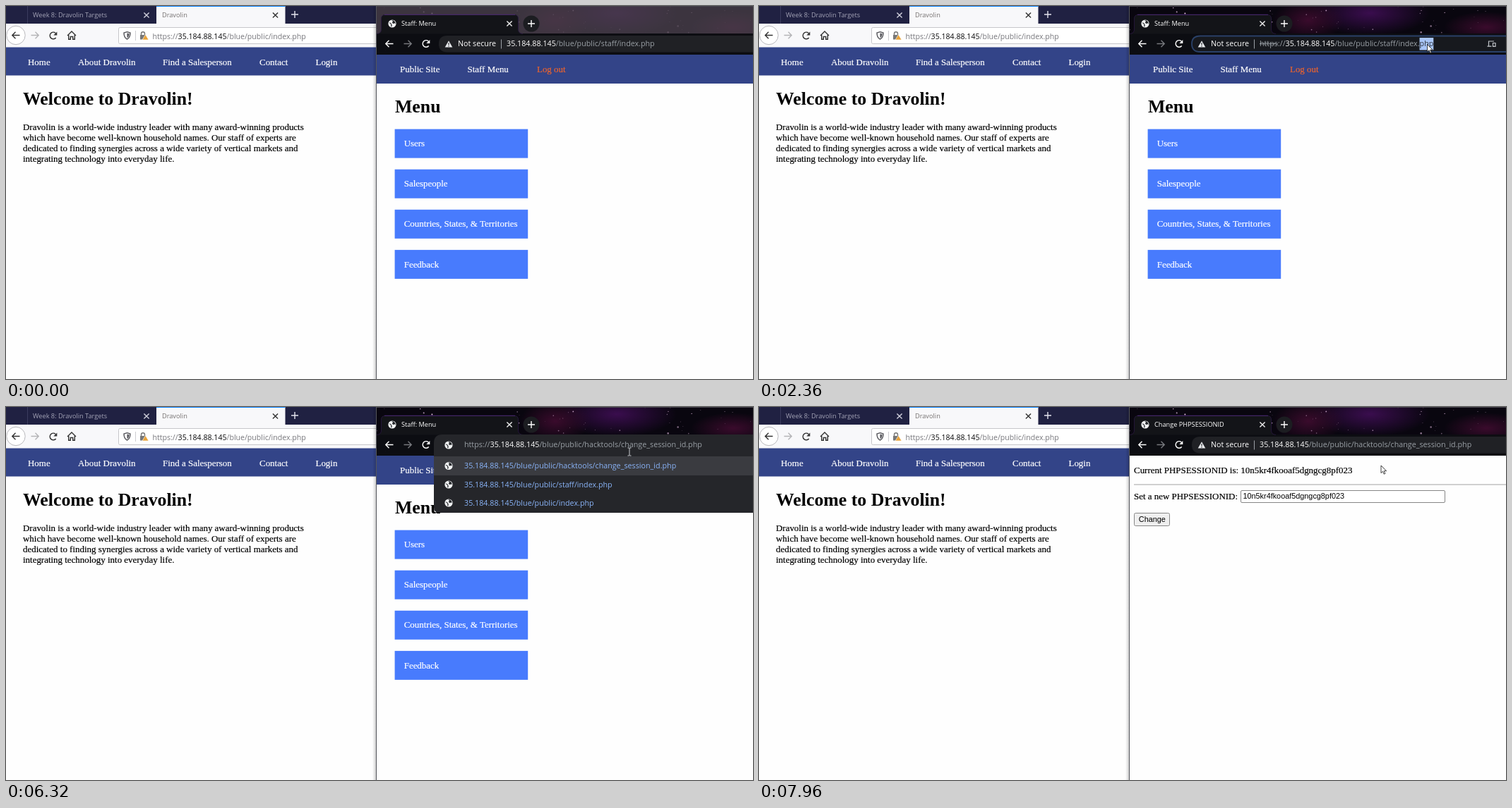
An HTML page that plays this animation: 1058x529 px, repeating every 8 s.

```html
<!DOCTYPE html>
<html lang="en">
<head>
<meta charset="utf-8">
<title>Session demo</title>
<style>
html, body { margin: 0; width: 100%; height: 100%; overflow: hidden; background: #fefefe; }
svg { display: block; width: 100%; height: 100%; }
text { white-space: pre; }
.ui { font-family: "Open Sans", sans-serif; font-size: 10.73px; }
.tab { font-family: "Open Sans", sans-serif; font-size: 9.2px; }
.page { font-family: "Liberation Serif", serif; font-size: 12.95px; fill: currentColor; stroke: currentColor; stroke-width: .2; }
.h1 { font-family: "Liberation Serif", serif; font-size: 25.8px; font-weight: bold; }
.form { font-family: "Liberation Sans", sans-serif; font-size: 10.85px; }
.white { color: #fff; fill: currentColor; }
.dim { fill: #9aa0a6; }
.struck { text-decoration: line-through; }
.sel tspan, .sel { fill: #2b3038; }
.line { fill: none; stroke-width: 1.4; }
</style>
</head>
<body>
<svg id="stage" viewBox="0 0 1058 529">
  <defs>
    <linearGradient id="shadow"><stop offset="0" stop-opacity="0"/><stop offset="1" stop-opacity=".22"/></linearGradient>
    <radialGradient id="violet"><stop offset="0" stop-color="#3a0d4e"/><stop offset="1" stop-color="#3a0d4e" stop-opacity="0"/></radialGradient>
    <radialGradient id="wine"><stop offset="0" stop-color="#3a0b2c"/><stop offset="1" stop-color="#3a0b2c" stop-opacity="0"/></radialGradient>
    <clipPath id="strip"><path d="M525 0H1058V69H525Z"/></clipPath>
    <path id="cross" class="line" d="M-3.6-3.6 3.6 3.6M3.6-3.6-3.6 3.6"/>
    <path id="plus" class="line" d="M-5 0H5M0-5V5"/>
    <path id="back" class="line" d="M5.5 0H-5M-.5-4.7-5.2 0-.5 4.7"/>
    <g id="reload"><path class="line" d="M3.7 3A4.8 4.8 0 1 1 3.2-3.6"/><path d="M5.3-5.6V-.6H.3Z" stroke="none"/></g>
    <g id="globe"><circle r="5.6" fill="#f1f3f4"/><path fill="#25272b" d="M-4.6-1.4-1.8 1.1-1.7 4.7-.2 3.2-.8.4-2.6-1.2ZM-1-4.6 1.2-3.2-.3-1.6 1.8.3 3.4-.8 4.7.5 4.2-2.4 1.6-4.7Z"/></g>
    <g id="warn"><path fill="#e8eaed" d="M0-4.8 5.3 4.4H-5.3Z"/><path stroke="#202124" stroke-width="1.2" d="M0-1.8V1.2M0 2.2V3.4"/></g>
    <path id="arrow" fill="#fff" stroke="#111" stroke-width=".8" d="M0 0V10.6L2.5 8.3 4.2 12.2 5.9 11.4 4.2 7.7H7.6Z"/>
    <path id="beam" fill="none" stroke="#c9ccd1" stroke-width="1" d="M-2.5-5.5H-.8L0-4.8.8-5.5H2.5M0-4.8V4.8M-2.5 5.5H-.8L0 4.8.8 5.5H2.5"/>
    <path id="hand" fill="#fff" stroke="#111" stroke-width=".8" d="M-1.3 1Q0-.6 1.3 1V5.2Q2.4 4.4 3.4 5.5 4.5 4.9 5.4 6 6.7 5.6 7 7V10Q6.7 12 5.4 14H-.2L-3.8 9.3Q-4.5 7.6-3 7.5L-1.3 8.9Z"/>
  </defs>

  <!-- left browser -->
  <path fill="#fefefe" d="M0 0H1058V529H0Z"/>
  <path fill="#202142" d="M0 0H525V25H0Z"/>
  <path stroke="#3b3c5e" d="M30.5 0V25"/>
  <path fill="#f8f8fa" d="M213 0H395.500V25H525V58.500H0V25H213Z"/>
  <path fill="#0a84ff" d="M213 0H395.500V1H213Z"/>
  <text class="tab" x="38" y="16.300" fill="#a3a3b6">Week 8: Dravolin Targets</text>
  <text class="tab" x="221" y="16.300" fill="#74706f">Dravolin</text>
  <use href="#cross" x="199" y="13" stroke="#d0d0dc"/>
  <use href="#cross" x="381.500" y="13" stroke="#333"/>
  <use href="#plus" x="409" y="12" stroke="#e4e4ee"/>
  <circle cx="14" cy="41.500" r="13.200" fill="#fff" stroke="#b9b9bd"/>
  <use href="#back" x="14" y="41.500" stroke="#333"/>
  <use href="#back" transform="translate(41 41.500) scale(-1 1)" stroke="#b5b5b8"/>
  <use href="#reload" x="67" y="42" stroke="#333" fill="#333"/>
  <path class="line" stroke="#333" d="M87 42 93 36 99 42M88.700 41V47.300H91.300V43.500H94.700V47.300H97.300V41"/>
  <path fill="#fff" stroke="#c6c6ca" d="M530 30.500H161.500Q159.500 30.500 159.500 32.500V51.500Q159.500 53.500 161.500 53.500H530"/>
  <path class="line" stroke="#55555a" d="M171.500 36.700 176 38Q176 45 171.500 47 167 45 167 38Z"/>
  <path fill="#55555a" d="M171.500 38.500 174.500 39.300Q174.500 43.700 171.500 45.300Z"/>
  <path stroke="#ceced2" d="M183.500 35V49"/>
  <path class="line" stroke="#777" d="M191.500 41V39Q191.500 36.800 194 36.800T196.500 39V41"/>
  <path fill="#777" d="M190 41H198V47.500H190Z"/>
  <path fill="#e8a33a" stroke="#fff" stroke-width=".6" d="M197.500 40.500 202 48H193Z"/>
  <text class="ui" x="207.500" y="46.600" style="font-size:10.580px" fill="#77777c">https://<tspan fill="#0c0c0d">35.184.88.145</tspan>/blue/public/index.php</text>
  <path fill="#334488" d="M0 58.500H525V98.500H0Z"/>
  <g class="page white">
    <text x="31" y="84.300">Home</text><text x="102" y="84.300">About Dravolin</text>
    <text x="222" y="84.300">Find a Salesperson</text><text x="359" y="84.300">Contact</text><text x="438.500" y="84.300">Login</text>
  </g>
  <text class="h1" x="24" y="140">Welcome to Dravolin!</text>
  <g class="page">
    <text x="24" y="176">Dravolin is a world-wide industry leader with many award-winning products</text>
    <text x="24" y="191">which have become well-known household names. Our staff of experts are</text>
    <text x="24" y="205.900">dedicated to finding synergies across a wide variety of vertical markets and</text>
    <text x="24" y="220.800">integrating technology into everyday life.</text>
  </g>

  <!-- right browser -->
  <path fill="url(#shadow)" d="M519 0H525V529H519Z"/>
  <path fill="#fefefe" d="M525 0H1058V529H525Z"/>
  <g clip-path="url(#strip)">
    <path fill="#09060f" d="M525 0H1058V69H525Z"/>
    <ellipse cx="865" cy="10" rx="85" ry="32" fill="url(#violet)"/>
    <ellipse cx="778" cy="20" rx="50" ry="30" fill="url(#wine)"/>
    <ellipse cx="1030" cy="30" rx="60" ry="22" fill="url(#wine)"/>
    <g id="stars"></g>
    <path data-on="0 1980" fill="#4b424d" fill-opacity=".78" d="M525 0H1058V39H525Z"/>
    <path fill="#0d0e12" fill-opacity=".95" d="M525 39H1058V69H525Z"/>
    <path fill="#131418" stroke="#2a1a42" stroke-width=".8" d="M525 39.500Q531.500 39 531.500 33V18Q531.500 12.500 537 12.500H720Q725.500 12.500 725.500 18V33Q725.500 39 732 39.500"/>
    <path stroke="#4b2a72" d="M536 12.300H721"/>
    <path stroke="#45414b" d="M525 .5H1058"/>
  </g>
  <path stroke="#55565c" d="M524.500 0V529"/>
  <use href="#cross" x="713" y="25" stroke="#eee"/>
  <circle cx="744" cy="25" r="11.500" fill="#1c1d21"/>
  <use href="#plus" x="744" y="25" stroke="#fff"/>
  <use href="#globe" x="547" y="25" data-on="0 6590"/>
  <use href="#globe" x="547" y="25" data-on="7210 8000"/>
  <path id="spinner" class="line" stroke="#e8eaed" data-on="6590 7210" d="M-5.300 0A5.300 5.300 0 0 1 0-5.300"/>
  <text class="tab white" x="560" y="28.300" data-on="0 7070">Staff: Menu</text>
  <text class="tab white" x="560" y="28.300" data-on="7070 8000">Change PHPSESSIONID</text>
  <use href="#back" x="543" y="53.500" stroke="#fff"/>
  <use href="#back" transform="translate(569 53.500) scale(-1 1)" stroke="#77797e"/>
  <g data-on="0 6590"><use href="#reload" x="595" y="53.500" stroke="#fff" fill="#fff"/></g>
  <g data-on="7210 8000"><use href="#reload" x="595" y="53.500" stroke="#fff" fill="#fff"/></g>
  <use href="#cross" x="595" y="53.500" stroke="#fff" data-on="6590 7210"/>

  <g id="menu" data-on="0 7070">
    <path fill="#334488" d="M525 69H1058V110H525Z"/>
    <g class="page white">
      <text x="558" y="94.300">Public Site</text><text x="653.500" y="94.300">Staff Menu</text>
      <text x="752" y="94.300" color="#f0642c" data-on="0 6590">Log out</text>
      <text x="752" y="94.300" color="#f01224" data-on="6590 7070">Log out</text>
    </g>
    <text class="h1" x="551" y="151">Menu</text>
  </g>
  <g data-on="7070 8000">
    <text class="page" x="531" y="94">Current PHPSESSIONID is: 10n5kr4fkooaf5dgngcg8pf023</text>
    <path stroke="#a2a2a2" d="M531 110H1058"/>
    <text class="page" x="531" y="130.800">Set a new PHPSESSIONID:</text>
    <rect x="682.500" y="118.500" width="289" height="17" rx="1.500" fill="#fff" stroke="#868686"/>
    <text class="form" x="685.500" y="130.300">10n5kr4fkooaf5dgngcg8pf023</text>
    <rect x="531.500" y="150.500" width="50" height="18" rx="2" fill="#efefef" stroke="#868686"/>
    <text class="form" x="537.800" y="163.300">Change</text>
  </g>

  <g id="bar">
    <path fill="#202125" d="M1058 42H625Q613 42 613 53.700T625 65.500H1058Z"/>
    <path data-on="1980 5820" fill="#17191e" stroke="#2a4168" stroke-width="1.800" d="M1062 42.500H625Q613 42.500 613 53.700T625 65H1062"/>
    <g data-on="1980 5820" class="line" stroke="#c4c7cc" style="stroke-width:1.200">
      <path d="M1041 50H1033.500V56.500M1031.500 57.200H1037.500M1039.500 52.500H1043V57.300H1039.500Z"/>
    </g>
  </g>
  <use id="cursor"/>
</svg>
<script>
const LOOP = 8000;
const $ = id => document.getElementById(id);
const add = (id, markup) => $(id).insertAdjacentHTML("beforeend", markup);

let seed = 11;
const rnd = () => (seed = seed * 16807 % 2147483647) / 2147483647;
for (let i = 0; i < 85; i++) {
  const r = rnd() ** 4 * 0.9 + 0.35;
  add("stars", `<circle cx="${525 + rnd() * 533}" cy="${rnd() * 66}" r="${r}" fill="#f0c8ee" opacity="${0.35 + rnd() * 0.65}"/>`);
}

["Users", "Salespeople", "Countries, States, &amp; Territories", "Feedback"].forEach((label, i) => {
  const y = 174.6 + 57.1 * i;
  const box = (fill, on) => `<rect x="550.6" y="${y}" width="188.600" height="41" fill="${fill}" data-on="${on}"/>`;
  add("menu", box("#487bfd", "0 8000") + (i === 1 ? box("#3f6fe0", "990 1100") : "") +
    `<text class="page white" x="563.7" y="${y + 24.6}">${label}</text>`);
});

// Address bar states
const host = `<tspan class="white">35.184.88.145</tspan>`;
const scheme = `<tspan class="struck">https</tspan>://`;
const staff = "/blue/public/staff/index.php";
const tools = "/blue/public/hacktools/change_session_id.php";
const sel = s => `<tspan class="sel">${s}</tspan>`;
const address = (on, x, content, extra = "") =>
  add("bar", `<g data-on="${on}">${extra}<text class="ui dim" x="${x}" y="57.300">${content}</text></g>`);
const insecure = `<use href="#warn" x="627" y="54"/><text class="ui white" x="640" y="57.300">Not secure</text>
  <path stroke="#9aa0a6" d="M701.500 47.500V60.500"/>`;
const caret = (on, x) => add("bar", `<path stroke="#e8eaed" data-on="${on}" d="M${x} 45.500V61"/>`);

address("0 1980", 709, host + staff, insecure);
address("1980 2360", 709, sel(host + staff), insecure);
[["2360 2980", "php"], ["2980 3240", ""], ["3240 3350", ".php"], ["3350 3470", "index.php"], ["3470 5820", "staff/index.php"]]
  .forEach(([on, tail]) =>
    address(on, 709, scheme + host + staff.slice(0, staff.length - tail.length) + sel(tail), insecure));
caret("2980 3240", 956.5);

add("bar", `<g data-on="5960 6590">
  <path fill="#25262a" d="M1058 39H618Q606 39 606 51V142Q606 150 614 150H1058Z"/>
  <path fill="#3a3b40" d="M606 70H1058V97H606Z"/>
  <use href="#globe" x="627" y="83.500"/><use href="#globe" x="627" y="110"/><use href="#globe" x="627" y="136"/>
  <g class="ui" fill="#8ab4f8">
    <text x="649" y="87.300">35.184.88.145${tools}</text>
    <text x="649" y="113.800">35.184.88.145${staff}</text>
    <text x="649" y="139.800">35.184.88.145/blue/public/index.php</text>
  </g></g>`);
address("5820 6590", 649, "https://" + host + tools, `<use href="#globe" x="627" y="54"/>`);
caret("5820 6320", 987);
address("6590 7210", 640, host + tools,
  `<circle class="line" cx="627" cy="54" r="4.800" stroke="#e8eaed" style="stroke-width:1.200"/>
   <path stroke="#e8eaed" stroke-width="1.300" d="M627 51V52.300M627 53.300V57"/>`);
address("7210 8000", 709, host + tools, insecure);

document.querySelectorAll(".sel").forEach(span => {
  if (!span.textContent) return;
  const x = span.getStartPositionOfChar(0).x, w = span.getComputedTextLength();
  span.parentNode.insertAdjacentHTML("beforebegin",
    `<rect x="${x}" y="45" width="${w}" height="17.500" fill="#a9c6f8"/>`);
});

// Pointer: time, x, y, shape
const pointer = [
  [0, -50, -50, "arrow"], [130, 930, 514, "arrow"], [240, 782, 482, "arrow"],
  [490, 800, 412, "arrow"], [610, 835, 270, "arrow"], [730, 857, 150, "arrow"], [850, 860, 99, "arrow"],
  [990, 705, 251, "hand"], [1100, 752, 222, "arrow"], [1220, 790, 190, "arrow"], [1350, 830, 155, "arrow"],
  [1470, 868, 120, "arrow"], [1600, 905, 88, "arrow"], [1720, 927, 67, "arrow"],
  [1840, 946, 56, "beam"], [2360, 946.5, 54.500, "arrow"], [2730, 977, 52, "beam"],
  [2980, 983, 46, "beam"], [3090, 954, 52, "beam"], [3240, 934, 53, "beam"], [3350, 904, 55, "beam"],
  [3470, 886, 54, "beam"], [3670, 889, 50, "arrow"], [3770, 880, 55, "arrow"], [3870, 873, 60, "arrow"],
  [3960, 882, 63, "arrow"], [5820, 883, 63.500, "beam"], [7960, 881, 83, "arrow"]
];
const spins = [[6590, 180], [6710, 270], [6870, 15], [6960, 110], [7070, 220]];
const at = (table, t) => table.findLast(row => row[0] <= t) || table[0];

const timed = [...document.querySelectorAll("[data-on]")].map(el => [el, ...el.dataset.on.split(" ").map(Number)]);

function draw() {
  const t = performance.now() % LOOP;
  for (const [el, from, to] of timed) el.style.display = t >= from && t < to ? "" : "none";
  const [, x, y, shape] = at(pointer, t);
  $("cursor").setAttribute("href", "#" + shape);
  $("cursor").setAttribute("transform", `translate(${x} ${y})`);
  $("spinner").setAttribute("transform", `translate(547 25) rotate(${at(spins, t)[1]})`);
  requestAnimationFrame(draw);
}
draw();
</script>
</body>
</html>
```
